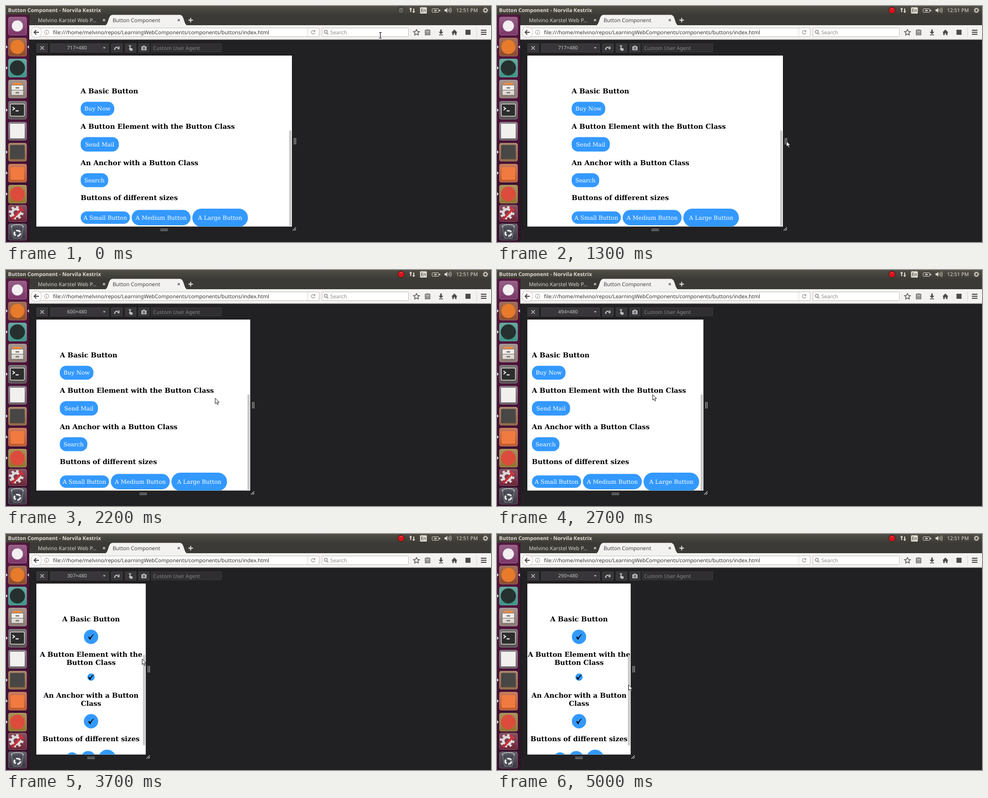
These frames come from a looping animation (960 px wide and 467 px high, 5.1 s). An HTML page:

```html
<!DOCTYPE html>
<html lang="en">
<head>
<meta charset="utf-8">
<title>Button Component</title>
<style>
@property --w { syntax: "<integer>"; inherits: true; initial-value: 717; }

html, body { margin: 0; width: 100%; height: 100%; overflow: hidden; background: #212022; }
html { --loop: 5100ms; animation: resize var(--loop) step-end infinite; }
svg { display: block; position: absolute; left: 0; top: 0; }
text, #size { font: 10.45px "Noto Sans", "Open Sans", sans-serif; text-rendering: geometricPrecision; white-space: pre; }

/* one viewport pixel is .7057 stage pixels */
#page { width: calc(var(--w) * .7057px); }
.mid { transform: translateX(calc(60px + var(--w) * .35285px)); }
.right { transform: translateX(calc(60px + var(--w) * .7057px)); }
#size { position: absolute; left: 121px; top: 76px; line-height: 14px; font-size: 9.75px; color: #c3c3c5; counter-reset: w var(--w); }
#size::before { content: counter(w) "×480"; }

.page text { font: 11.29px "DejaVu Serif", serif; fill: #fff; text-anchor: middle; }
.page .h { font-weight: bold; font-size: 13.55px; fill: #000; }
.wide .h { text-anchor: start; }
.blue { fill: #3399ff; }
.wide { animation: wide var(--loop) step-end infinite; }
.narrow { animation: narrow var(--loop) step-end infinite; }
.cursor { animation: move var(--loop) infinite; }
.beam { animation: beam var(--loop) step-end infinite; }
.arrow { animation: arrow var(--loop) step-end infinite; }
.rec { animation: rec var(--loop) step-end infinite; }

@keyframes resize {
  0% { --w: 717; }
  43.13% { --w: 600; }
  45.09% { --w: 494; }
  54.9% { --w: 400; }
  56.86% { --w: 307; }
  76.47% { --w: 300; }
  82.35% { --w: 294; }
  86.27%, 100% { --w: 290; }
}
@keyframes wide { 0% { visibility: visible; } 56.86%, 100% { visibility: hidden; } }
@keyframes narrow { 0% { visibility: hidden; } 56.86%, 100% { visibility: visible; } }
@keyframes beam { 0% { visibility: visible; } 3.92%, 100% { visibility: hidden; } }
@keyframes arrow { 0% { visibility: hidden; } 3.92%, 100% { visibility: visible; } }
@keyframes rec { 0% { fill: #5b5a56; } 1.96%, 100% { fill: #d8141c; } }
@keyframes move {
  0% { transform: translate(741px, 58px); animation-timing-function: steps(7); }
  13.72% { transform: translate(580px, 273px); animation-timing-function: steps(7); }
  27.45% { transform: translate(571px, 266px); animation-timing-function: steps(6); }
  39.21% { transform: translate(456px, 256px); animation-timing-function: steps(7); }
  52.94% { transform: translate(307.5px, 246px); animation-timing-function: steps(3); }
  58.82% { transform: translate(280.5px, 246px); animation-timing-function: steps(7); }
  72.54% { transform: translate(269px, 247px); animation-timing-function: steps(5); }
  82.35% { transform: translate(266px, 247px); animation-timing-function: steps(6); }
  94.11% { transform: translate(263px, 257px); animation-timing-function: steps(2); }
  98.03%, 100% { transform: translate(260px, 298px); }
}
</style>
</head>
<body>
<svg width="960" height="467">
  <defs>
    <linearGradient id="bar" x2="0" y2="1"><stop stop-color="#504d45"/><stop offset="1" stop-color="#3d3b36"/></linearGradient>
    <linearGradient id="dock" x2="0" y2="1"><stop stop-color="#54163f"/><stop offset=".5" stop-color="#481237"/><stop offset="1" stop-color="#35102b"/></linearGradient>
    <linearGradient id="gloss" x2="0" y2="1"><stop stop-color="#fff" stop-opacity=".2"/><stop offset="1" stop-color="#fff" stop-opacity="0"/></linearGradient>
    <clipPath id="view"><rect x="60" y="98" width="900" height="338.5"/></clipPath>
    <g id="tile"><rect x="4.5" y="-18" width="36.5" height="36.5" rx="4"/><rect x="5" y="-17.5" width="35.5" height="35.5" rx="3.5" fill="url(#gloss)" stroke="#fff" stroke-opacity=".25"/></g>
    <path id="run" d="M0-3.5 3.5 0 0 3.5Z" fill="#d8d0d5"/>
    <path id="check" d="M-5.6 .8-3.8-.6-1.9 2Q1.4-3.4 5.2-5.6L5.6-4.9Q1.5-.5-1.4 5.4H-2.8Z"/>
    <g id="gear" fill="none"><circle r="3"/><circle r="4.6" stroke-dasharray="1.8 1.8"/></g>
    <path id="x" d="M-2-2 2 2M2-2-2 2" fill="none" stroke-width="1.5"/>
  </defs>

  <!-- top panel -->
  <rect width="960" height="17.5" fill="url(#bar)"/>
  <g fill="#dfdbd2">
    <text x="4" y="12" style="font-weight:bold;font-size:10.3px">Button Component - Norvila Kestrix</text>
    <text x="891" y="12" style="font-size:9.95px">12:51 PM</text>
    <circle class="rec" cx="782" cy="8.5" r="6.5" stroke="#24231f"/>
    <path d="M779.5 6q2.5-2 5 0" fill="none" stroke="#fff" stroke-opacity=".35"/>
    <path d="M801 3l3 3.5h-2V12h-2V6.5h-2ZM807 14l-3-3.5h2V5h2v5.5h2Z"/>
    <rect x="819.5" y="2.5" width="13.5" height="12.5" rx="1.5"/>
    <path d="M868 6.5h2.5l3-3v10l-3-3H868Z"/>
    <g fill="none" stroke="#dfdbd2">
      <path d="M875.5 6q1.5 2.5 0 5M877.5 4.5q3 4 0 8M879.5 3q4 5.5 0 11"/>
      <rect x="843.5" y="5.5" width="13" height="7" rx="1"/>
      <path d="M858.5 7.5v3" stroke-width="2"/>
      <path d="M847 9h6M850 7v4" stroke-width="1.3"/>
      <use href="#gear" x="949" y="8.5" stroke-width="1.5"/>
    </g>
    <text x="821" y="12" style="font-size:9px;fill:#35332f">En</text>
  </g>

  <!-- tabs -->
  <rect x="46" y="17" width="914" height="22" fill="#3c3a36"/>
  <path d="M194 39c10 0 7-21.500 17-21.500H344c10 0 7 21.500 17 21.500Z" fill="#f3f2f1"/>
  <text x="63" y="32" fill="#dad6ce">Melvino Karstel Web P…</text>
  <text x="211" y="32" fill="#45433f">Button Component</text>
  <use href="#x" x="194" y="28" stroke="#d5d1c9"/>
  <use href="#x" x="342" y="28" stroke="#66645f"/>
  <path d="M361 28h9M365.5 23.5v9" stroke="#e0ddd6" stroke-width="2"/>

  <!-- navigation bar -->
  <rect x="46" y="38" width="914" height="28.5" fill="#f3f2f1"/>
  <path d="M46 66h914" stroke="#b9b7b4"/>
  <g fill="#fff" stroke="#c3c1be">
    <rect x="66" y="43.5" width="554" height="17" rx="1"/>
    <rect x="625.5" y="43.5" width="171" height="17" rx="1"/>
    <circle cx="60" cy="52" r="10.5"/>
  </g>
  <path d="M597.5 44v16M931.5 43v18" stroke="#d5d3d0"/>
  <g fill="none" stroke="#4a4a4a" stroke-width="1.8">
    <path d="M65 52h-9M60 47.5 55.5 52l4.5 4.5"/>
    <path d="M940 48h11M940 52h11M940 56h11"/>
    <path d="M812.5 46.5l1.8 3.7 4 .5-3 2.8.8 4-3.6-2-3.6 2 .8-4-3-2.8 4-.5Z" stroke-width="1.3"/>
    <rect x="830" y="48" width="9" height="9" stroke-width="1.3"/>
    <path d="M832 47.5h5M831 51.5h7M831 54.5h7" stroke-width="1.3"/>
  </g>
  <g fill="#4a4a4a">
    <path d="M859.5 46.5h3V51h3L861 56l-4.5-5h3ZM857 56.5h8v1.5h-8Z"/>
    <path d="M887.5 46.5l6 6h-1.8v5h-3v-3.5h-2.4v3.5h-3v-5h-1.8Z"/>
    <rect x="909.5" y="47" width="10" height="10"/>
  </g>
  <g fill="none" stroke="#8d8d8d">
    <circle cx="80.5" cy="52" r="4.3"/><path d="M80.5 51v3.5M80.5 49v1"/>
    <path d="M611 50a3.5 3.5 0 1 0 .5 3M611.5 47.5V50.5H608.5" stroke-width="1.2"/>
    <circle cx="633" cy="51" r="3" stroke-width="1.4"/><path d="M635 53.5l3 3" stroke-width="1.6"/>
  </g>
  <text x="93" y="56" fill="#333">file:///home/melvino/repos/LearningWebComponents/components/buttons/index.html</text>
  <text x="642" y="56" fill="#8b8b8b">Search</text>

  <!-- responsive view toolbar -->
  <g fill="#38363a" stroke="#3e3c40">
    <rect x="60.5" y="74.5" width="22" height="17"/>
    <rect x="87.5" y="74.5" width="116" height="17"/>
    <rect x="208.5" y="74.5" width="22" height="17"/>
    <rect x="235.5" y="74.5" width="22" height="17"/>
    <rect x="262.5" y="74.5" width="21" height="17"/>
    <rect x="287.5" y="74.5" width="139.5" height="16.5" fill="#302e31" stroke="#38363a"/>
  </g>
  <g fill="none" stroke="#c3c3c5" stroke-width="1.4">
    <path d="M68 79.5l7 7M75 79.5l-7 7"/>
    <path d="M215 87q0-6 6.5-5.5" stroke-width="2"/>
    <path d="M243 79.5a2.5 2.5 0 0 1 4.500 0"/>
  </g>
  <g fill="#c3c3c5">
    <path d="M192 81.5h5l-2.5 3Z"/>
    <path d="M220 84.5 224.5 79V86Z"/>
    <path d="M244.5 79.5q1-1 2 0v3.5l4.5 1.5-1 4h-4l-3-4 1.5-.5Z"/>
    <path d="M268 80h2.5l1-1.500h3l1 1.500h2.5v7.5h-10Z"/>
  </g>
  <circle cx="273" cy="83.5" r="1.9" fill="#c3c3c5" stroke="#343236" stroke-width="1.2"/>
  <text x="291" y="87" fill="#858487" style="font-size:10.2px">Custom User Agent</text>

  <!-- dock -->
  <rect y="17.5" width="46" height="450" fill="url(#dock)"/>
  <path d="M45.5 17.5V467" stroke="#2b0d22"/>
  <use href="#tile" y="39.5" fill="#7b3768"/><circle cx="22.5" cy="39.5" r="11" fill="#f4eef2"/>
  <use href="#tile" y="81" fill="#8b4a2c"/><circle cx="22.5" cy="81" r="14" fill="#e77a2b"/>
  <use href="#tile" y="122.5" fill="#3a9585"/><circle cx="22.5" cy="122.5" r="15" fill="#26302f"/>
  <use href="#tile" y="164" fill="#8c7a72"/>
  <g stroke="#77706b">
    <path d="M12 157l2-5h17l2 5Z" fill="#ee8a3f" stroke="none"/>
    <rect x="10.5" y="156.5" width="24" height="10" fill="#f0eeec"/>
    <rect x="10.5" y="166.5" width="24" height="10" fill="#dddad7"/>
    <path d="M19 162h7M19 171.5h7" stroke-width="2.5"/>
  </g>
  <use href="#tile" y="206" fill="#55504f"/>
  <rect x="8.5" y="194" width="28" height="24" rx="2" fill="#2d2d2d" stroke="#d5d3d1" stroke-width="1.5"/>
  <path d="M13 200l4 3-4 3M19 207.5h6" fill="none" stroke="#fff" stroke-width="1.8"/>
  <use href="#tile" y="247.5" fill="#6a5f66"/><rect x="8" y="233" width="29" height="29" fill="#f1f0ef"/>
  <use href="#tile" y="289" fill="#8f653f"/><rect x="8" y="275" width="29" height="28" rx="2" fill="#484746"/>
  <use href="#tile" y="330.5" fill="#b9592f"/><rect x="9" y="319" width="27" height="25" rx="2" fill="#f07a3f"/>
  <use href="#tile" y="372" fill="#93752f"/><circle cx="22.5" cy="372" r="14.5" fill="#dd4b3d"/>
  <g transform="translate(0 410) scale(1 .92)">
    <use href="#tile" fill="#6b2638"/>
    <use href="#gear" transform="translate(20 -1) scale(2.600)" stroke="#dddad9" stroke-width="2"/>
    <path d="M12 13 30-8M28-14q-1 7 7 8" fill="none" stroke="#c9303a" stroke-width="4.5"/>
  </g>
  <g transform="translate(0 447) scale(1 .9)">
    <use href="#tile" fill="#3a3440"/>
    <ellipse cx="22.5" cy="-12" rx="12" ry="4" fill="#55565e" stroke="#c9cacd" stroke-width="1.5"/>
    <path d="M11-10l4 24h15l4-24" fill="#474a53" stroke="#8f9198"/>
    <circle cx="22.5" cy="3" r="6" fill="none" stroke="#e8e8e9" stroke-width="3.5" stroke-dasharray="9.5 3"/>
  </g>
  <use href="#run" y="81"/><use href="#run" y="122.5"/><use href="#run" y="206"/>
  <use href="#run" y="289"/><use href="#run" y="330.5"/><use href="#run" y="372"/>
  <path d="M45.5 77.5 42 81l3.5 3.5Z" fill="#d8d0d5"/>

  <!-- resizable page -->
  <rect id="page" x="60" y="98" height="338.5" fill="#fff" stroke="#000" stroke-opacity=".45" stroke-width="2" paint-order="stroke"/>
  <g clip-path="url(#view)" class="page">
    <g class="mid wide">
      <text class="h" x="-165.2" y="172.7">A Basic Button</text>
      <text class="h" x="-165.2" y="242.7">A Button Element with the Button Class</text>
      <text class="h" x="-165.2" y="314.5">An Anchor with a Button Class</text>
      <text class="h" x="-165.2" y="384.3">Buttons of different sizes</text>
      <g class="blue">
        <rect x="-165.2" y="189.5" width="66.5" height="27.5" rx="12.5"/>
        <rect x="-165.2" y="259.5" width="75.5" height="28.5" rx="12.5"/>
        <rect x="-165.2" y="331" width="54.5" height="27.5" rx="12.5"/>
        <rect x="-165.2" y="406.5" width="97.5" height="24.5" rx="12.2"/>
        <rect x="-64.2" y="403.5" width="116.5" height="30.5" rx="15"/>
        <rect x="55.8" y="401" width="110" height="36" rx="18"/>
      </g>
      <text x="-132" y="207.2">Buy Now</text>
      <text x="-127.5" y="277.7">Send Mail</text>
      <text x="-138" y="348.7">Search</text>
      <text x="-116.5" y="422.8">A Small Button</text>
      <text x="-6" y="422.8">A Medium Button</text>
      <text x="110.8" y="422.8">A Large Button</text>
    </g>
    <g class="mid narrow">
      <text class="h" y="172.7">A Basic Button</text>
      <text class="h" y="243.2">A Button Element with the</text>
      <text class="h" y="259.2">Button Class</text>
      <text class="h" y="323.5">An Anchor with a Button</text>
      <text class="h" y="339.5">Class</text>
      <text class="h" y="410">Buttons of different sizes</text>
      <g class="blue">
        <circle cy="203.5" r="14.2"/><circle cy="283.2" r="7.2"/><circle cy="370.5" r="14.2"/>
        <circle cx="-37.5" cy="444.5" r="12.5"/><circle cx="-5.5" cy="444.5" r="15"/><circle cx="32" cy="444.5" r="17.7"/>
      </g>
      <use href="#check" y="203.5"/><use href="#check" y="283"/><use href="#check" y="370.5"/>
    </g>
    <g class="right" fill="#c8c8c8">
      <rect class="wide" x="-5.5" y="246" width="4.2" height="189.5" rx="2"/>
      <rect class="narrow" x="-5.5" y="239" width="4.2" height="179.5" rx="2"/>
    </g>
  </g>
  <g fill="none" stroke="#b9b9ba" stroke-width="1.2">
    <path class="right" d="M4.5 261v13M7.5 261v13M1.5 444.5l6.5-6.5M5 444.5l3-3"/>
    <path class="mid" d="M-7.5 441.5h15M-7.5 444.5h15"/>
  </g>

  <g class="cursor">
    <g class="beam" fill="none">
      <path d="M-2.5-5.5h5M0-5.5v11M-2.5 5.5h5" stroke="#fff" stroke-width="2.6"/>
      <path d="M-2.5-5.5h5M0-5.5v11M-2.5 5.5h5" stroke="#111" stroke-width="1.2"/>
    </g>
    <path class="arrow" d="M.5.500V11.3L3 9 4.9 13.200 6.700 12.400 4.900 8.400H8.300Z" fill="#fff" stroke="#222"/>
  </g>
</svg>
<div id="size"></div>
</body>
</html>
```
